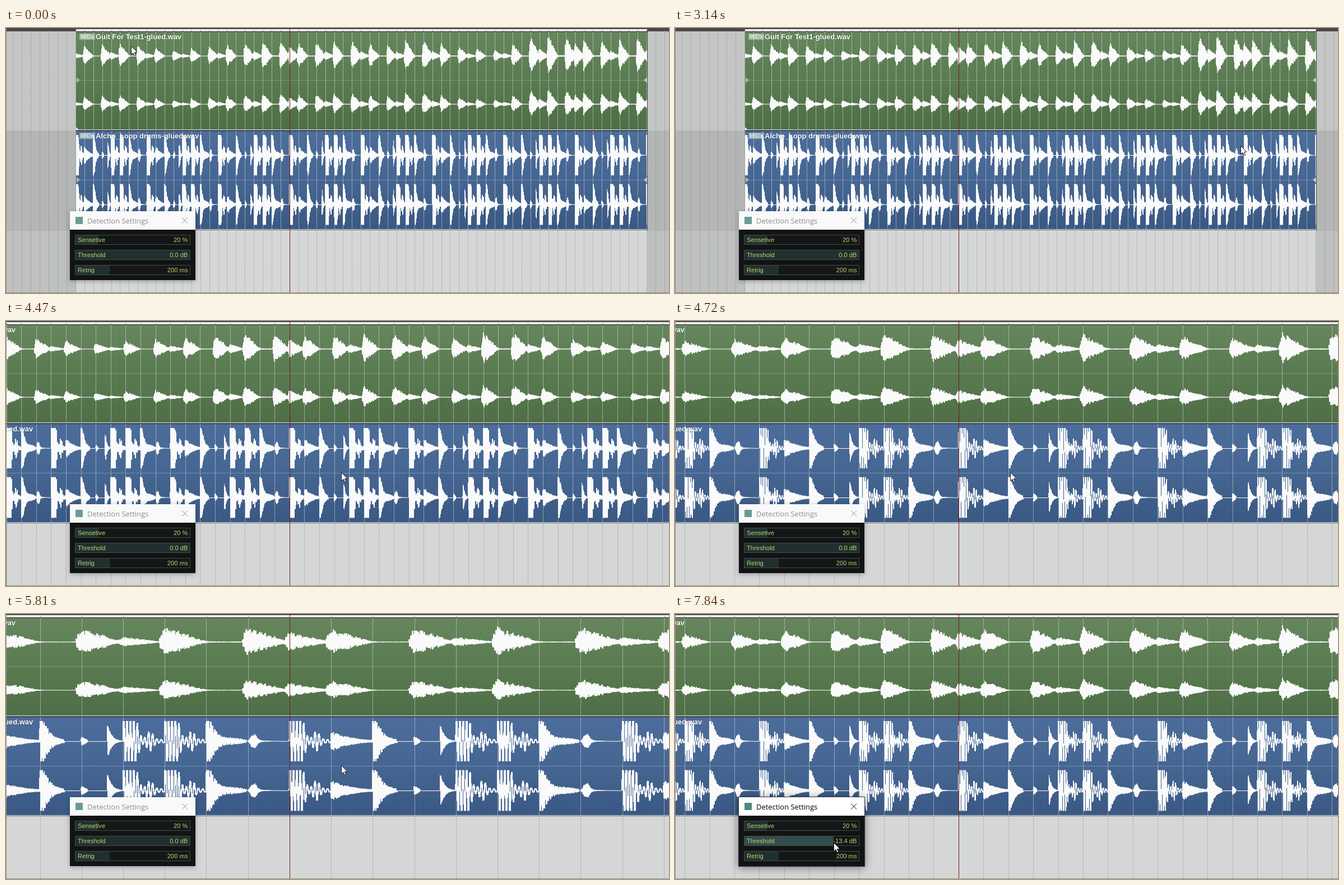
An HTML page with a canvas that plays this animation: 1183x473 px, repeating every 8000 ms.

```html
<!DOCTYPE html>
<html lang="en">
<head>
<meta charset="utf-8">
<title>Detection settings</title>
<style>
html, body { margin: 0; width: 100%; height: 100%; overflow: hidden; background: #d5d7d6; }
canvas { display: block; }
</style>
</head>
<body>
<canvas id="stage" width="1183" height="473"></canvas>
<script>
const W = 1183, H = 473, LOOP = 8000, TICK = 261, LEAD = 30, PLAYHEAD = 506.4;
const ctx = document.getElementById('stage').getContext('2d');

const clamp = (v, lo, hi) => Math.max(lo, Math.min(hi, v));
const rand = n => { const v = Math.sin(n * 127.1) * 43758.5453; return v - Math.floor(v); };
const bump = (d, at, width) => Math.exp(-(((d - at) / width) ** 2));

// Linear path through key points [position, ...values]
function along(points, t) {
  const i = clamp(points.findIndex(p => p[0] > t), 1, points.length - 1);
  const a = points[i - 1], b = t >= points[points.length - 1][0] ? points[points.length - 1] : points[i];
  const k = b === points[i] ? clamp((t - a[0]) / (b[0] - a[0]), 0, 1) : 1;
  return b.slice(1).map((v, j) => a[j + 1] + k * (v - a[j + 1]));
}

// tick, x, y
const POINTER = [
  [0, 223, 32], [2, 287, 16], [4, 182, 13], [5, 320, 13], [6, 320, 13], [7, 618, 215], [8, 537, 216],
  [10, 526, 211], [11, 466, 322], [12, 1009, 210], [13, 807, 90], [14, 456, 122], [15, 510, 323],
  [16, 589, 281], [17, 598, 270], [23, 598, 270], [26, 330, 408], [27, 330, 408], [30, 283, 408]
];
const ACTIVE_TICK = 27;
const zoomAt = tick => tick <= 20 ? clamp(tick - 16, 0, 4) : Math.max(2, 25 - tick);

// An eight-beat drum bar
const kick = d => 48 * Math.exp(-((d / .38) ** 6)) + 14 * bump(d, .65, .1) + 6 * (1 - .4 * d);
const hit = length => d => d > length ? 0 : 34 * Math.exp(-((d / .22) ** 2)) + 10 * Math.sqrt(1 - d / length * .9);
const DRUMS = [
  { at: 0, freq: 13, env: kick },
  { at: 1, freq: 61, noise: .35, env: d => 20 * Math.exp(-2.1 * d) },
  { at: 2, freq: 22, noise: .15, env: hit(.59) },
  { at: 3, freq: 53, noise: .2, env: d => d < .14 ? 8 * Math.sqrt(1 - d / .15) : 0 },
  { at: 3.63, freq: 57, noise: .2, env: d => 32 * Math.exp(-10 * d) },
  { at: 4, freq: 13, env: kick },
  { at: 5, freq: 13, env: kick },
  { at: 6, freq: 21, noise: .15, env: hit(.96) },
  { at: 7, freq: 49, noise: .35, env: d => 11 * bump(d, .15, .09) + 4 * Math.exp(-3 * d) * Math.min(1, d * 12) }
];

function drumSignal(u) {
  const p = ((u % 8) + 8) % 8;
  let i = DRUMS.length - 1;
  while (DRUMS[i].at > p) i--;
  const { at, freq, noise = 0, env } = DRUMS[i];
  const d = p - at;
  const cycles = noise ? freq * d : freq * d - 2 * d * d;
  return clamp(env(d) * Math.sin(cycles * 2 * Math.PI) * (1 - noise * rand(Math.floor(p * freq))), -36, 36);
}

// beat, loudness of the guitar
const LOUDNESS = [[-24, 17], [-19, 24], [-13, 11], [-3, 29], [1, 24], [7, 28], [11, 20], [14, 35],
  [18, 19], [23, 12], [25, 24], [28, 42], [35, 28], [40, 36]];

// Full plucks on odd beats, softer ones on every fourth
const strength = n => n % 2 ? 1 : n % 32 === 0 ? .7 : n % 4 === 0 ? .35 : 0;

function guitarSignal(u) {
  const shifted = u + .12;
  let n = Math.floor(shifted);
  if (!strength(n)) n--;
  const d = shifted - n;
  const decay = 1.18 * Math.exp(-1.3 * d - d ** 6) + .04;
  const level = along(LOUDNESS, n)[0] * strength(n) * Math.min(1, .3 + d * 6) * decay;
  const s = level * Math.sin(u * 22 * 2 * Math.PI) * (1 - .35 * rand(Math.floor(u * 22) + 600));
  return s > 0 ? s : s * .86;
}

function rect(x, y, w, h, color) {
  ctx.fillStyle = color;
  ctx.fillRect(x, y, w, h);
}

function line(x1, y1, x2, y2, color, dash = []) {
  ctx.setLineDash(dash);
  ctx.strokeStyle = color;
  ctx.lineWidth = 1;
  ctx.beginPath();
  ctx.moveTo(x1, y1);
  ctx.lineTo(x2, y2);
  ctx.stroke();
  ctx.setLineDash([]);
}

function polygon(points, fill) {
  ctx.beginPath();
  points.forEach(([x, y]) => ctx.lineTo(x, y));
  ctx.closePath();
  ctx.fillStyle = fill;
  ctx.fill();
}

function text(str, x, y, font, color, align = 'left') {
  ctx.font = font;
  ctx.textAlign = align;
  ctx.fillStyle = color;
  ctx.fillText(str, x, y);
}

// Each pixel column spans the lowest and highest sample of a short window
function waveform(signal, beat, x0, x1, lanes) {
  const samples = 14, span = Math.max(1.7, beat * .033);
  ctx.fillStyle = '#fafafa';
  for (let x = x0; x < x1; x++) {
    let lo = Infinity, hi = -Infinity;
    for (let i = 0; i <= samples; i++) {
      const s = signal((x + span * i / samples - PLAYHEAD) / beat);
      lo = Math.min(lo, s);
      hi = Math.max(hi, s);
    }
    for (const [mid, gain] of lanes) {
      ctx.fillRect(x, mid - hi * gain, 1, Math.max(1, (hi - lo) * gain));
    }
  }
}

function item(o, x0, x1, beat, zoomed) {
  const fill = ctx.createLinearGradient(0, o.top, 0, o.bottom);
  o.colors.forEach((c, i) => fill.addColorStop(i / (o.colors.length - 1), c));
  rect(x0, o.top, x1 - x0, o.bottom - o.top, fill);
  line(x0, o.mid + .5, x1, o.mid + .5, o.divider);
  waveform(o.signal, beat, x0, x1, o.lanes);
  line(x0, o.top + .5, x1, o.top + .5, '#22282c');
  line(x0, o.bottom - .5, x1, o.bottom - .5, '#d4d9d8');
  line(x0, o.bottom + .5, x1, o.bottom + .5, '#6c7274');
  if (zoomed) return;
  line(x1 + .5, o.top, x1 + .5, o.bottom + 1, '#3b4144');
  polygon([[x0 + 1, o.mid - 5], [x0 + 7, o.mid], [x0 + 1, o.mid + 5]], '#aab5ab');
  polygon([[x1, o.mid - 5], [x1 - 6, o.mid], [x1, o.mid + 5]], '#c3cac3');
  polygon([[x0, o.bottom - 5], [x0 + 5, o.bottom], [x0, o.bottom]], '#f4f4f4');
}

function title(o, shift) {
  const y = o.top + 14;
  rect(131 + shift, y - 10, 28, 11, 'rgba(205,215,212,.55)');
  text('MIDx', 133 + shift, y - 1, 'bold 10px "Liberation Sans", sans-serif', 'rgba(245,248,246,.75)');
  ctx.shadowColor = 'rgba(0,0,0,.5)';
  ctx.shadowBlur = 2;
  text(o.name, 160 + shift, y, 'bold 12.9px "Liberation Sans", sans-serif', '#fff');
  ctx.shadowBlur = 0;
}

const ITEMS = [
  { name: 'Guit For Test1-glued.wav', top: 6, mid: 93, bottom: 182, signal: guitarSignal,
    lanes: [[50, 1], [136, .73]], colors: ['#66865d', '#5a7b51', '#4f6e47'], divider: '#7c9674' },
  { name: 'Alcho_Loop drums-glued.wav', top: 183, mid: 271, bottom: 360, signal: drumSignal,
    lanes: [[227, 1], [315, 1.01]], colors: ['#4c6d9b', '#466692', '#395883'], divider: '#6f8cb2' }
];

function arrange(zoom) {
  const beat = 15.92 * 1.6705 ** zoom;
  const x0 = Math.max(0, Math.ceil(PLAYHEAD - 24 * beat));
  const x1 = Math.min(W, Math.ceil(PLAYHEAD + 40 * beat));

  rect(0, 0, W, 183, '#c4c6c5');
  rect(0, 183, W, 179, '#b4b6b5');
  rect(0, 362, W, 111, '#bec1c0');
  rect(x0, 0, x1 - x0, H, '#d5d7d6');
  rect(0, 0, W, 6, '#484848');
  rect(x0, 2, x1 - x0, 4, '#f6f4f6');

  const first = Math.ceil(-PLAYHEAD / beat), last = Math.floor((W - PLAYHEAD) / beat);
  const beats = draw => {
    for (let n = first; n <= last; n++) draw(Math.floor(PLAYHEAD + n * beat) + .5);
  };
  beats(x => {
    line(x, 7, x, H, 'rgba(95,98,98,.5)', [1, 1]);
    line(x, 4, x, 6, '#777');
  });
  ITEMS.forEach(o => item(o, x0, x1, beat, zoom > 0));
  beats(x => {
    if (x < x0 || x > x1) return;
    ITEMS.forEach(o => line(x, o.top + 1, x, o.bottom - 1, 'rgba(235,240,238,.68)', [2, 1]));
  });
  ITEMS.forEach(o => title(o, zoom ? -296 : 0));
  line(506.5, 0, 506.5, H, '#701d20');
  line(.5, 0, .5, H, '#8b8d8d');
  line(0, H - .5, W, H - .5, '#8b8d8d');
}

function slider(y, label, value, part, fill) {
  rect(123, y, 206, 18, '#35504f');
  rect(124, y + 1, 204, 16, '#151717');
  rect(124, y + 1, 204 * part, 16, fill);
  const font = '11.2px "Liberation Sans", sans-serif';
  text(label, 128, y + 13, font, '#b9d36c');
  text(value, 324.5, y + 13, font, '#b9d36c', 'right');
}

function dialog(active, db) {
  const ink = active ? '#000' : '#8d8d8d';
  ctx.shadowColor = active ? 'rgba(0,0,0,.45)' : 'rgba(0,0,0,.28)';
  ctx.shadowBlur = active ? 14 : 8;
  ctx.shadowOffsetY = 2;
  if (active) rect(113, 326, 226, 125, '#30343a');
  else rect(114, 327, 224, 123, '#131313');
  ctx.shadowBlur = ctx.shadowOffsetY = 0;
  rect(114, 327, 224, 33, active ? '#fff' : '#f9f9f9');
  rect(114, 360, 224, 90, '#131313');
  rect(124, 337, 13, 13, active ? '#4b8a83' : '#6b9b96');
  text('Detection Settings', 145, 348.5, '12.9px "Open Sans", "Noto Sans", sans-serif', ink);
  line(314, 338.5, 324, 348.5, ink);
  line(324, 338.5, 314, 348.5, ink);
  slider(369, 'Sensetive', '20 %', .2, '#21302f');
  slider(396, 'Threshold', db.toFixed(1) + ' dB', 1 + db / 60, active ? '#344c4b' : '#21302f');
  slider(423, 'Retrig', '200 ms', .3, '#21302f');
}

function pointer(x, y) {
  ctx.save();
  ctx.translate(x + .5, y + .5);
  polygon([[0, 0], [0, 15], [3.4, 11.8], [5.8, 17], [8.2, 16], [5.8, 11], [10.5, 10.6]], '#fff');
  ctx.strokeStyle = '#1c1c1c';
  ctx.lineWidth = 1;
  ctx.stroke();
  ctx.restore();
}

let shown;
function frame(now) {
  const tick = Math.floor((now % LOOP + LEAD) / TICK);
  if (tick !== shown) {
    shown = tick;
    const [x, y] = along(POINTER, tick).map(Math.round);
    const active = tick >= ACTIVE_TICK;
    arrange(zoomAt(tick));
    dialog(active, active ? Math.min(0, (x - 328.56) / 204 * 60) : 0);
    pointer(x, y);
  }
  requestAnimationFrame(frame);
}
frame(performance.now());
</script>
</body>
</html>
```
